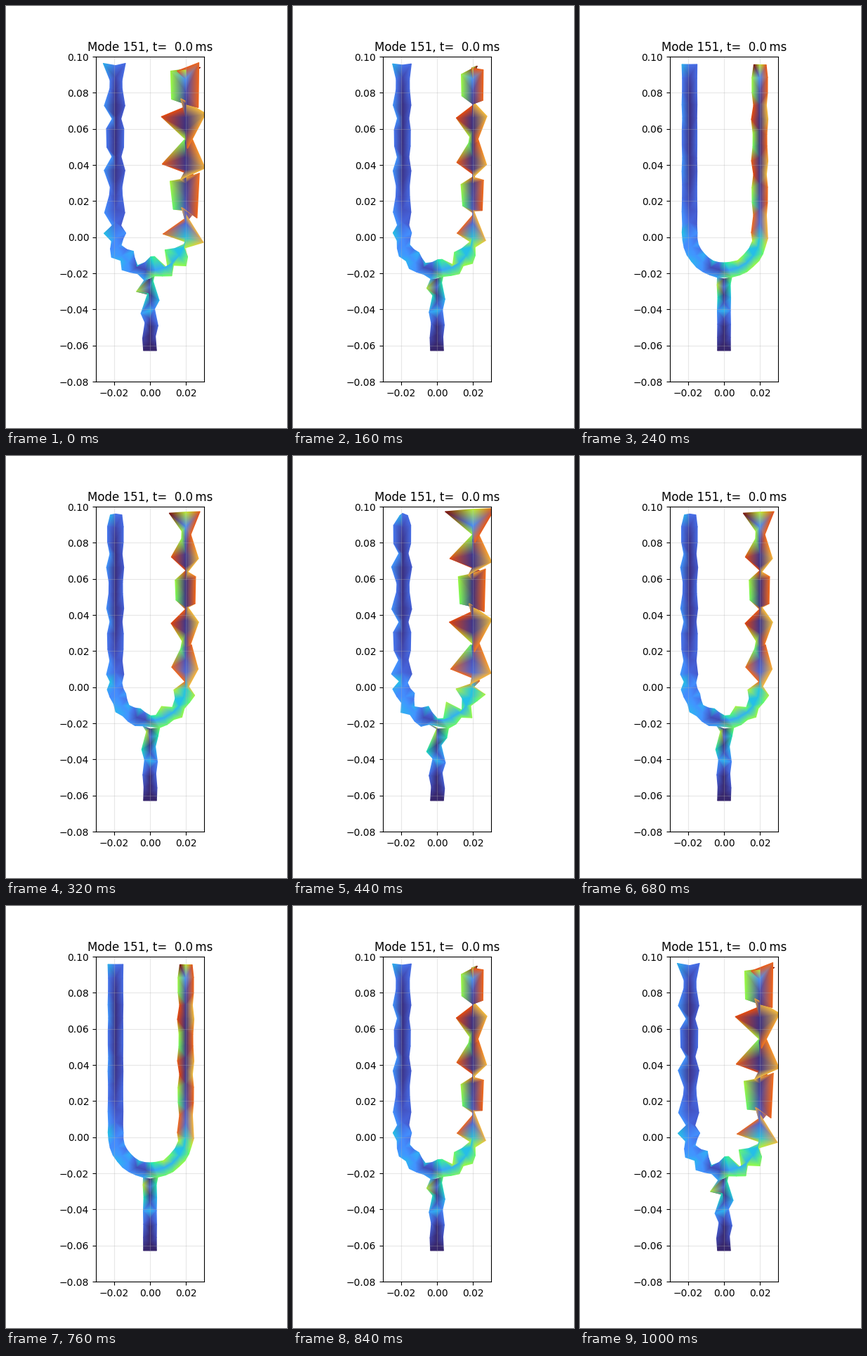
A matplotlib script for the animation above (1.02 s loop, 400 px wide and 600 px high).

```python
import numpy as np
import matplotlib.pyplot as plt
from matplotlib.animation import FuncAnimation
from matplotlib.tri import Triangulation

FRAMES, INTERVAL = 51, 20
SCALE = 462 / 0.18                      # pixels per metre
CX, CY, ARM, HALF = 206, 326, 50, 10.5  # bend centre, its radius, half width
TOP, STEM_X, STEM_HALF = 83, 205, 9.3
PEAK = 30                               # displacement at the end of the colour map
WAVE = 2.367                            # phase advance from node to node
LEFT, RIGHT, OUTER, INNER = -1, 1, 1, -1

nodes, triangles = [], []


def add(x, y, dx=0, dy=0, value=0):
    nodes.append((x, y, dx, dy, value))
    return len(nodes) - 1


def edge_node(side, face, angle, y, out, along, base=0):
    """Node on the fork's edge, moved across (out) and along the arm."""
    nx, ny = side * np.cos(angle), np.sin(angle)
    r = ARM + face * HALF
    dx = face * out * nx - along * side * np.sin(angle)
    dy = face * out * ny + along * np.cos(angle)
    return add(CX + r * nx, y + r * ny, dx, dy,
               np.sqrt(out**2 + along**2 + base**2) / PEAK)


def prong(side, face, count, bottom, out, along):
    line = []
    for i, y in enumerate(np.linspace(TOP, bottom, count)):
        phase = WAVE * i - 0.4
        gain = 1 + 0.3 * np.exp(-i)
        line.append(edge_node(side, face, 0, y, out * gain * np.cos(phase),
                              along * np.sin(phase)))
    return line


def bend(side, face, count, span, amps, base, step=WAVE, drift=0):
    angles = np.radians(np.linspace(*span, count))
    return [edge_node(side, face, angle, CY, amp * np.cos(step * j), drift, base)
            for j, (angle, amp) in enumerate(zip(angles, np.geomspace(*amps, count)))]


def prong_core(side, tip):
    line = []
    for y in np.linspace(TOP, 308, 13):
        near_tip = tip * np.exp(-(y - TOP) / 15)
        root = 0.08 * ((y - TOP) / 225)**6
        line.append(add(CX + side * ARM, y, 0, 16 * near_tip,
                        0.04 + root + near_tip))
    return line


def bend_core():
    line = []
    for deg in np.linspace(4, 176, 12):
        a = np.radians(deg)
        value = 0.17 + deg / 1800 - 0.18 * np.exp(-((deg - 75) / 14)**2)
        line.append(add(CX - ARM * np.cos(a), CY + ARM * np.sin(a), value=value))
    return line


def stem_edge(side, amp, decay):
    line = []
    for i, y in enumerate(np.linspace(396, 490, 6)):
        out = amp * (-decay)**i if i < 5 else 0
        value = np.sqrt(2 * out**2 + (8 * 0.65**i)**2) / PEAK
        line.append(add(STEM_X + side * STEM_HALF, y, side * out, out, value))
    return line


def stem_core():
    return [add(STEM_X, y, value=0.03 + 0.22 * np.exp(-((y - 433) / 9)**2)
                + 0.08 * np.exp(-((y - 400) / 8)**2))
            for y in np.linspace(388, 490, 10)]


def gap(i, j):
    return np.hypot(nodes[i][0] - nodes[j][0], nodes[i][1] - nodes[j][1])


def strip(a, b):
    """Fill the band between two lines, always taking the shorter diagonal."""
    i = j = 0
    while i < len(a) - 1 or j < len(b) - 1:
        step_a = j == len(b) - 1 or (
            i < len(a) - 1 and gap(a[i + 1], b[j]) <= gap(a[i], b[j + 1]))
        if step_a:
            triangles.append((a[i], a[i + 1], b[j]))
            i += 1
        else:
            triangles.append((a[i], b[j + 1], b[j]))
            j += 1


left_outer = (prong(LEFT, OUTER, 13, 311, 6, 4)
              + bend(LEFT, OUTER, 9, (-4, 80), (6, 4), 5, drift=2))
right_outer = (prong(RIGHT, OUTER, 12, 298, -19, -24)
               + bend(RIGHT, OUTER, 8, (4, 80), (15, 4), 12, drift=5))
left_inner = (prong(LEFT, INNER, 13, 311, 3, 4)
              + bend(LEFT, INNER, 9, (-5, 90), (4, 9), 4, step=np.pi / 2))
right_inner = (prong(RIGHT, INNER, 12, 298, -26, -11)
               + bend(RIGHT, INNER, 6, (-6, 80), (22, 12), 8))

core = prong_core(LEFT, 0.1) + bend_core() + prong_core(RIGHT, 0.5)[::-1]
stem = stem_core()
strip(left_outer[-1:] + stem_edge(LEFT, 10, 0.6), stem)
strip(right_outer[-1:] + stem_edge(RIGHT, -5, 0.75), stem)
strip(left_inner + right_inner[::-1], core)
strip(left_outer + right_outer[::-1], core)

x, y, dx, dy, value = np.array(nodes).T

fig, ax = plt.subplots(figsize=(4, 6), dpi=100)
ax.set_aspect("equal")
ax.set(xlim=(-0.03, 0.03), ylim=(-0.08, 0.10), xticks=(-0.02, 0, 0.02))
ax.set_title(f"Mode 151, t={0:5.1f}\u2009ms")


def update(frame):
    for mesh in list(ax.collections):
        mesh.remove()
    a = np.cos(2 * np.pi * frame / (FRAMES - 1))
    px, py = x + a * dx, y + a * dy
    tri = Triangulation((px - 205) / SCALE, 0.10 - (py - 72) / SCALE, triangles)
    mesh = ax.tripcolor(tri, value, shading="gouraud", cmap="turbo",
                        vmin=0, vmax=1)
    ax.grid(True, alpha=0.3)  # tripcolor switches the grid off
    return [mesh]


anim = FuncAnimation(fig, update, frames=FRAMES, interval=INTERVAL,
                     repeat=True, repeat_delay=0)
plt.show()
```
